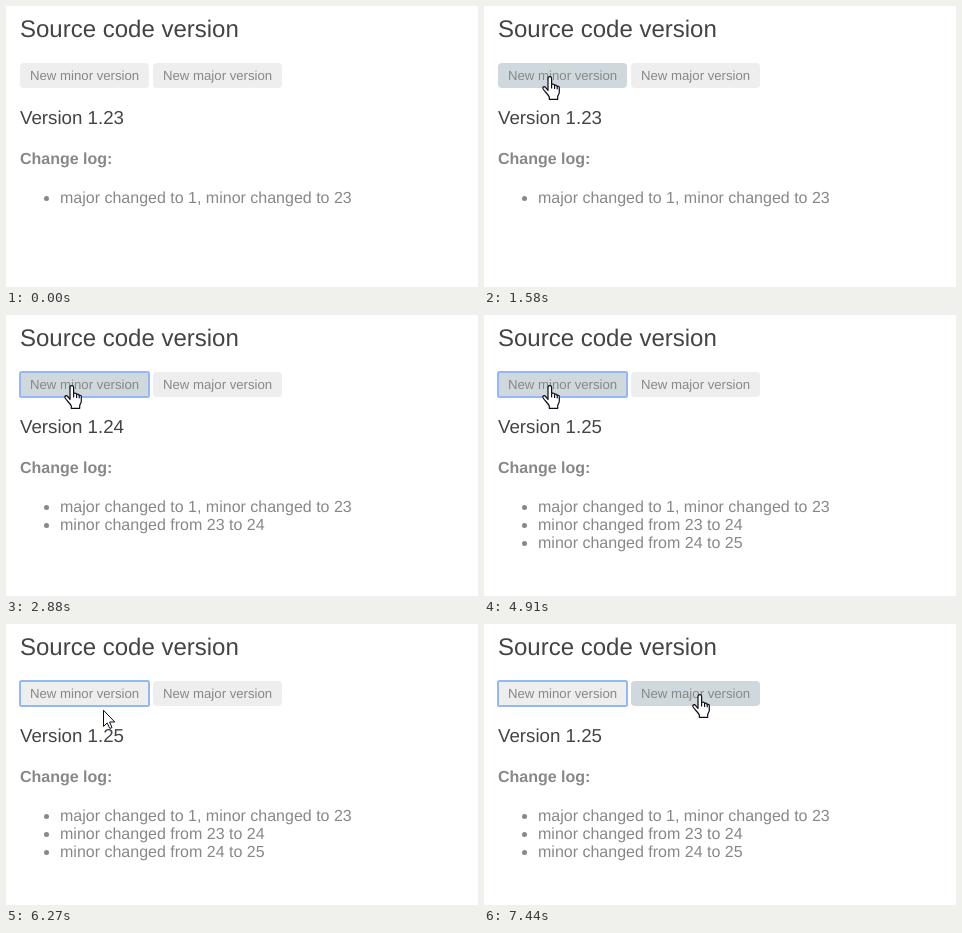
Recreate the animation shown at these times as an HTML page. Size 472 px wide and 281 px high, loop 8 s.

```html
<!DOCTYPE html>
<html lang="en">
<head>
<meta charset="utf-8">
<title>Source code version</title>
<style>
  html, body { margin: 0; width: 100%; height: 100%; overflow: hidden; background: #fff; }
  svg { display: block; width: 472px; height: 281px; }
  text {
    font-family: "Liberation Sans", Arial, sans-serif;
    font-size: 16px;
    fill: #888;
    text-rendering: geometricPrecision;
    white-space: pre;
  }
  .title { font-size: 24px; fill: #444; }
  .version { font-size: 18.72px; fill: #444; }
  .label { font-size: 13.2px; }
  .log { font-weight: bold; }
  circle { fill: #888; }
  .ring { fill: none; stroke: #94b8f3; stroke-width: 2; }
  .cursor { fill: #fff; stroke: #0b0b1c; stroke-linejoin: round; stroke-linecap: round; }
</style>
</head>
<body>
<svg viewBox="0 0 472 281">
  <text class="title" x="14" y="31">Source code version</text>

  <rect id="minor" x="14" y="57" width="129" height="25" rx="4"/>
  <rect id="major" x="147" y="57" width="129" height="25" rx="4"/>
  <rect id="ring" class="ring" x="14" y="57" width="129" height="25" rx="1.5"/>
  <text class="label" x="24" y="74">New minor version</text>
  <text class="label" x="157" y="74">New major version</text>

  <text id="version" class="version" x="14" y="118"></text>
  <text class="log" x="14" y="158">Change log:</text>
  <g id="list"></g>

  <g id="hand" class="cursor" stroke-width="1.2">
    <path d="M6 14.5V2.4a1.8 1.8 0 0 1 3.6 0V8.4q2.6-.7 3 .9q2.2-.6 2.6 1q2.1-.3 2.1 1.7V16c0 2-1.3 3-1.6 4.6V23.3H7.3V21C6 18 2.4 15.5 1 12.8c-.8-1.9 1.2-2.7 2.5-1.5z"/>
    <path fill="none" d="M9.6 8.4V12M12.6 9.3V12.4M15.2 10.3V12.8"/>
  </g>
  <path id="arrow" class="cursor" stroke-width="1" d="M.5 .7V16.4L4.2 13l2.6 5.5 2.2-1L6.6 12H11.4z"/>
</svg>
<script>
const LOOP = 8000;
const FIRST = 23;
const PLAIN = "#eee";
const HOVER = "#cfd8dc";
const $ = id => document.getElementById(id);

// time, cursor, x, y, hovered button
const moves = [
  [0, "", 0, 0, ""],
  [1310, "hand", 43, 74, "minor"],
  [1430, "hand", 52, 73, "minor"],
  [1580, "hand", 58, 70, "minor"],
  [6000, "hand", 66, 74, "minor"],
  [6120, "hand", 77, 78, "minor"],
  [6270, "arrow", 97, 86, ""],
  [6430, "arrow", 119, 98, ""],
  [6580, "arrow", 141, 101, ""],
  [6710, "arrow", 164, 101, ""],
  [6860, "arrow", 188, 97, ""],
  [7010, "arrow", 198, 91, ""],
  [7140, "arrow", 205, 85, ""],
  [7290, "hand", 203, 79, "major"],
  [7440, "hand", 208, 70, "major"]
];
const focusAt = 2730;
const bumps = [2880, 4910];

const entries = [
  `major changed to 1, minor changed to ${FIRST}`,
  ...bumps.map((_, i) => `minor changed from ${FIRST + i} to ${FIRST + i + 1}`)
];
$("list").innerHTML = entries.map((entry, i) => {
  const y = 197 + i * 18;
  return `<g><circle cx="40.5" cy="${y - 4.5}" r="2.5"/><text x="54" y="${y}">${entry}</text></g>`;
}).join("");
const rows = [...$("list").children];

function show(el, on) {
  el.style.visibility = on ? "visible" : "hidden";
}

function draw(t) {
  const [, cursor, x, y, hovered] = moves.findLast(m => m[0] <= t);
  for (const id of ["hand", "arrow"]) {
    show($(id), id === cursor);
    $(id).setAttribute("transform", `translate(${x} ${y})`);
  }
  for (const id of ["minor", "major"]) {
    $(id).setAttribute("fill", id === hovered ? HOVER : PLAIN);
  }
  show($("ring"), t >= focusAt);

  const count = bumps.filter(b => b <= t).length;
  $("version").textContent = `Version 1.${FIRST + count}`;
  rows.forEach((row, i) => show(row, i <= count));
}

const start = performance.now();
function tick() {
  draw((performance.now() - start) % LOOP);
  requestAnimationFrame(tick);
}
tick();
</script>
</body>
</html>
```
